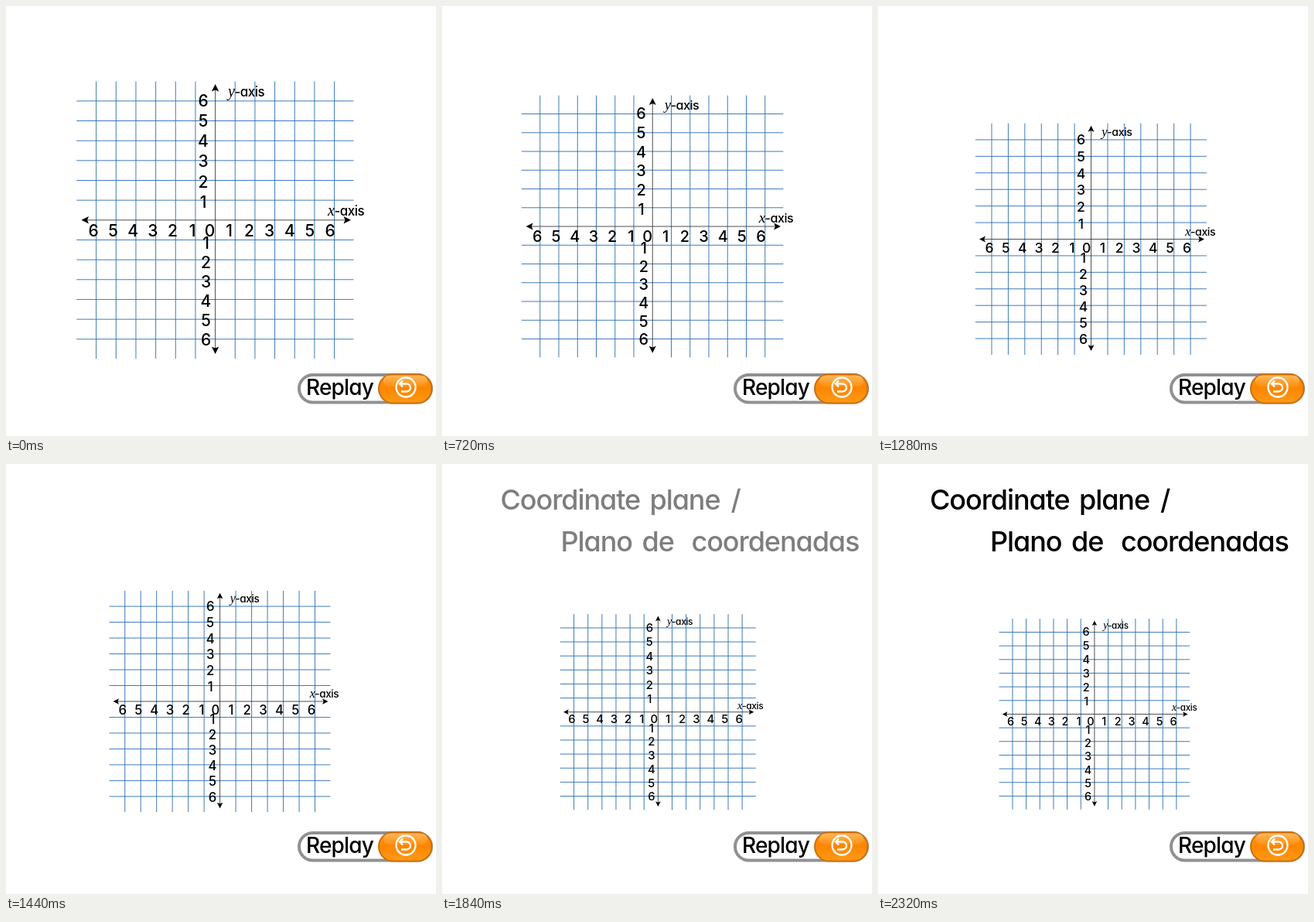
Recreate the animation shown at these times as an HTML page. Size 556 by 556 pixels, loop 3760 ms.

```html
<!DOCTYPE html>
<html lang="en">
<head>
<meta charset="utf-8">
<title>Coordinate plane</title>
<style>
  html, body { margin: 0; width: 100%; height: 100%; overflow: hidden; background: #fff; }
  svg { display: block; width: 100%; height: 100%; }
  text { font-family: Inter, Lato, sans-serif; font-weight: 500; font-feature-settings: "cv11"; letter-spacing: -.03em; white-space: pre; }
  .number { font-size: 21px; text-anchor: middle; letter-spacing: 0; }
  .axis-name { font-size: 17px; }
  .variable { font: italic 20px "Liberation Serif", serif; }
  .title { font-size: 36px; }
  .line { vector-effect: non-scaling-stroke; stroke: #2a6cb4; stroke-width: .9; }
  .axis { stroke: #222; stroke-width: .8; }
</style>
</head>
<body>
<svg viewBox="0 0 556 556">
  <defs>
    <linearGradient id="orange" x2="0" y2="1">
      <stop offset="0" stop-color="#ff9410"/>
      <stop offset=".5" stop-color="#fc8600"/>
      <stop offset="1" stop-color="#ff9a18"/>
    </linearGradient>
    <linearGradient id="shine" x2="0" y2="1">
      <stop offset="0" stop-color="#ffb558"/>
      <stop offset="1" stop-color="#ff9010"/>
    </linearGradient>
  </defs>

  <g id="plane">
    <g id="grid"></g>
    <g id="arrows"></g>
    <g id="numbers"></g>
    <text class="axis-name" x="287" y="117"><tspan class="variable">y</tspan>-axis</text>
    <text class="axis-name" x="416" y="271"><tspan class="variable">x</tspan>-axis</text>
  </g>

  <g id="title" class="title">
    <text y="59"><tspan x="67">Coordinate</tspan> <tspan x="260">plane</tspan> <tspan x="365">/</tspan></text>
    <text y="113"><tspan x="145">Plano</tspan> <tspan x="250">de</tspan> <tspan x="314">coordenadas</tspan></text>
  </g>

  <g id="button">
    <rect x="379" y="477" width="171" height="35.5" rx="17.7" fill="#fff" stroke="#919191" stroke-width="4"/>
    <text x="388" y="503" font-size="28">Replay</text>
    <rect x="482" y="476" width="68.5" height="37.5" rx="18.7" fill="url(#orange)" stroke="#cc7010" stroke-width="2"/>
    <rect x="488" y="478" width="57" height="14" rx="7" fill="url(#shine)"/>
    <g fill="none" stroke="#fff" stroke-width="2.3">
      <circle cx="517" cy="493" r="12.5"/>
      <path d="M510 488.500H518a5 5 0 0 1 0 10H511M513 484.500l-4 4 4 4"/>
    </g>
  </g>
</svg>
<script>
const LOOP = 3760, TICK = 80, SHRINK_TICKS = 17;
const CX = 270.6, CY = 276.8, CELL = 25.66;
const $ = id => document.getElementById(id);
const clamp = (v, lo, hi) => Math.min(hi, Math.max(lo, v));

function add(parent, tag, attrs, text = "") {
  const node = document.createElementNS("http://www.w3.org/2000/svg", tag);
  for (const key in attrs) node.setAttribute(key, attrs[key]);
  node.textContent = text;
  $(parent).append(node);
}

const line = (d, extra = "") => add("grid", "path", { d, class: "line " + extra });
const number = (n, x, y) => add("numbers", "text", { x, y: y + 7.6, class: "number" }, n);
const arrow = (x, y, angle) => add("arrows", "path", {
  d: "M0 0L4.700 9.500L0 7.500L-4.700 9.500Z", transform: `translate(${x} ${y}) rotate(${angle})`
});

for (let k = -6; k <= 6; k++) {
  if (!k) continue;
  line(`M${CX + k * CELL} 97.500V456`);
  line(`M91.300 ${CY + k * CELL}H449.500`);
}
line(`M${CX} 106V444`, "axis");
line(`M103 ${CY}H441`, "axis");
arrow(CX, 101, 0);
arrow(446, CY, 90);
arrow(CX, 450, 180);
arrow(97.5, CY, 270);

number(0, 263.5, 290);
for (let k = 0; k < 6; k++) {
  number(6 - k, 113 + 25.6 * k, 290);
  number(k + 1, 288.5 + 26.1 * k, 290);
  number(6 - k, 255, 122.5 + 26.1 * k);
  number(k + 1, 258.5, 306 + 25.1 * k);
}

function draw(time) {
  const tick = Math.floor(time / TICK);

  // The plane shrinks evenly, pausing for one tick on the way.
  const moved = tick - 6;
  const step = clamp(moved > 6 ? moved - 1 : moved, 0, SHRINK_TICKS);
  const scale = 1 - 0.01834 * step;
  $("plane").setAttribute("transform", `translate(${5.511 * step} ${7.82 * step}) scale(${scale})`);

  const shown = clamp((tick - 21) / 4, 0, 1);
  $("title").setAttribute("transform", `translate(${17 * (1 - shown)} 0)`);
  $("title").setAttribute("opacity", shown);
}

function loop() {
  draw(performance.now() % LOOP);
  requestAnimationFrame(loop);
}
loop();
</script>
</body>
</html>
```
